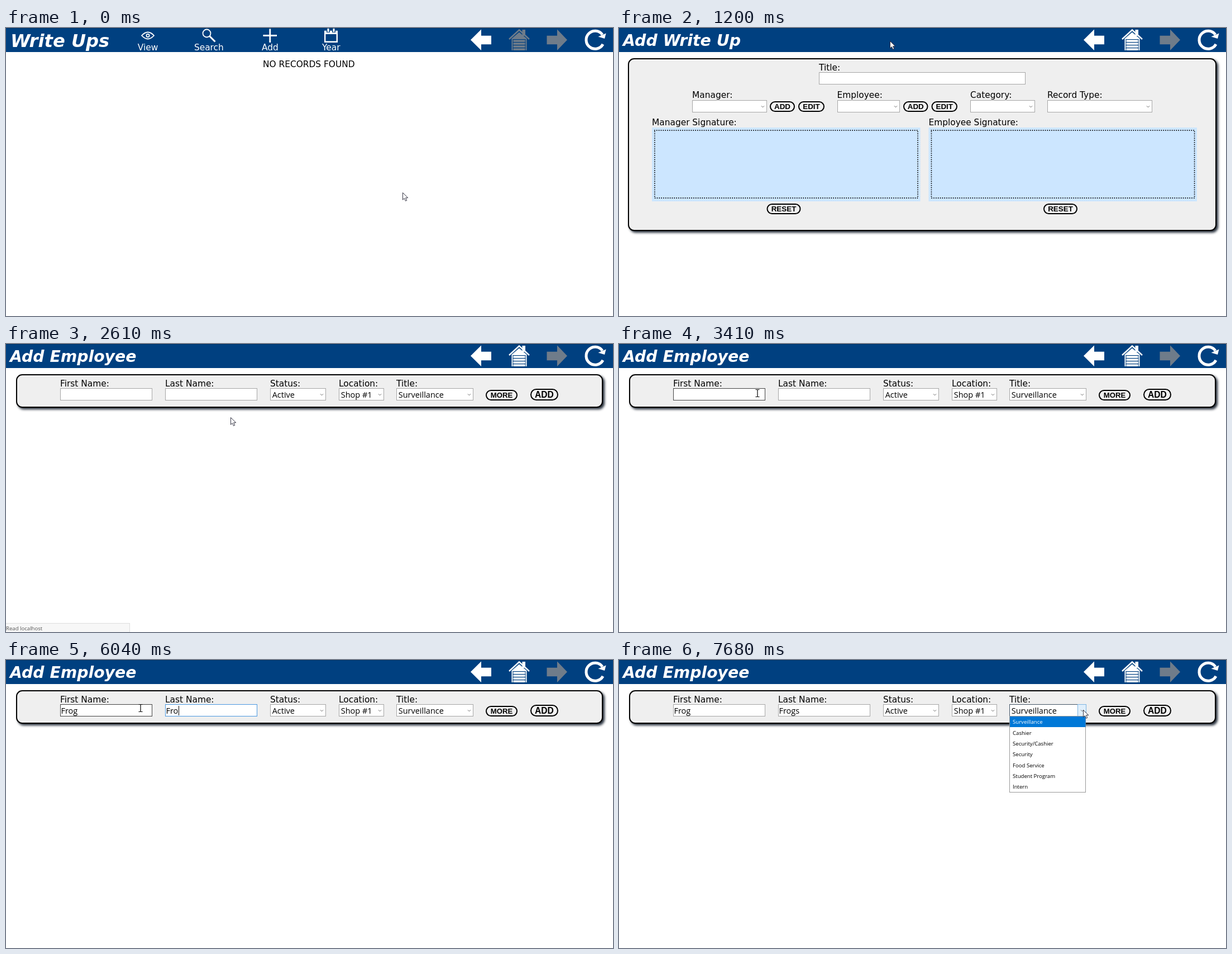
Write an HTML page that moves like this. It is 1087x515 px and loops after 8000 ms.

```html
<!DOCTYPE html>
<html lang="en">
<head>
<meta charset="utf-8">
<title>Write Ups</title>
<style>
  html, body { margin: 0; width: 100%; height: 100%; overflow: hidden; background: #fff; }
  svg { display: block; width: 100%; height: 100%; }
  text { font: 15.4px "DejaVu Sans", sans-serif; white-space: pre; }
  .title { font-weight: bold; font-style: oblique; fill: #fff; }
  .menu { fill: #fff; text-anchor: middle; }
  .value { font: 14.5px "Open Sans", sans-serif; }
  .small { font: 500 9.6px "Open Sans", sans-serif; }
  .button { font: bold 13.4px "Liberation Sans", Arial, sans-serif; text-anchor: middle; }
  .panel { filter: drop-shadow(3px 3px 2px rgba(0, 10, 25, .85)); }
</style>
</head>
<body>
<svg id="stage" viewBox="0 0 1087 515"></svg>
<script>
const LOOP = 8000;
const NAVY = '#004080', GREY = '#6f7c8a', BORDER = '#a6a6a6', HOVER = '#0f52a5';
const FIRST = 'Frog', LAST = 'Frogs';
const stage = document.getElementById('stage');
const pen = document.createElement('canvas').getContext('2d');

const text = (x, y, s, cls = '', extra = '') =>
  `<text x="${x}" y="${y}" class="${cls}" ${extra}>${s}</text>`;
const rect = (x, y, w, h, fill, extra = '') =>
  `<rect x="${x}" y="${y}" width="${w}" height="${h}" fill="${fill}" ${extra}/>`;
const path = (d, fill = 'none', stroke = 'none', width = 1, extra = '') =>
  `<path d="${d}" fill="${fill}" stroke="${stroke}" stroke-width="${width}" ${extra}/>`;

// Boxes are given by their outer left, top, right and bottom edges.
const box = (l, t, r, b, fill, stroke, width = 1, extra = '') =>
  rect(l + width / 2, t + width / 2, r - l - width, b - t - width, fill,
    `stroke="${stroke}" stroke-width="${width}" ${extra}`);

const panel = (l, t, r, b) => box(l, t, r, b, '#efefef', '#000', 2, 'rx="10" class="panel"');
const input = (l, t, r, border = BORDER) => box(l, t, r, t + 22, '#fff', border);
const chevron = (x, y) => path(`M${x - 2.5} ${y - 1.2}l2.5 2.5 2.5-2.5`, 'none', '#666');
const select = (l, t, r, value = '') =>
  input(l, t, r) + chevron(r - 7.5, t + 11.5) + text(l + 3.7, t + 16.5, value, 'value');

function button(l, t, r, label, { color = '#000', height = 19, size = 13.4 } = {}) {
  return box(l, t, r, t + height, '#f2f2f2', color, 2, `rx="${height / 2 - 1}"`) +
    text((l + r) / 2, t + height / 2 + size * .36, label, 'button',
      `fill="${color}" style="font-size:${size}px"`);
}

function field(l, value, border, caret) {
  pen.font = '14.5px "Open Sans", sans-serif';
  const end = Math.round(l + 2 + pen.measureText(value).width);
  return input(l, 79, l + 165, border) + text(l + 1.5, 95.5, value, 'value') +
    (caret ? rect(end, 82, 1, 17, '#000') : '');
}

function house(color) {
  let doors = '';
  for (let y = 20; y < 40; y += 5) doors += rect(907.5, y, 23, 1.2, NAVY);
  return rect(924.5, 3, 5.5, 11, color) +
    path('M901 20L919 3.5 937 20', 'none', color, 2.4) +
    path('M905.5 19L919 7.5 932.5 19V40H905.5z', color) + doors +
    path('M908 20V40M930 20V40', 'none', NAVY, 1);
}

function header(title, size, x, y, homeColor) {
  return rect(0, 0, 1087, 43, NAVY) + rect(0, 0, 1087, 1, '#003366') +
    text(x, y, title, 'title', `style="font-size:${size}px"`) +
    path('M832 21.3L851 2.5V13.7H869V29.3H851V40z', '#fff') + house(homeColor) +
    path('M1005 21.3L987 2.5V13.7H968.5V29.3H987V40z', GREY) +
    path('M1068 12A16 16 0 1 0 1069 29', 'none', '#fff', 5) +
    path('M1060.5 15.5L1074.5 9.5 1072 19z', '#fff');
}

function listPage() {
  const labels = ['View', 'Search', 'Add', 'Year'];
  return header('Write Ups', 32.2, 8, 34, GREY) +
    labels.map((s, i) => text(254 + i * 109.4, 40, s, 'menu')).join('') +
    path('M243 13.5Q254 1.5 265 13.5Q254 25.5 243 13.5z', 'none', '#fff', 1.8) +
    '<circle cx="254" cy="13.5" r="2.6" fill="none" stroke="#fff" stroke-width="1.8"/>' +
    '<circle cx="359.5" cy="9.5" r="7" fill="none" stroke="#fff" stroke-width="1.8"/>' +
    path('M364.5 14.5L374.5 24.5', 'none', '#fff', 3) +
    path('M460.5 13.5H485M472.8 1.5V26', 'none', '#fff', 2.8) +
    path('M571.2 6V24.7H592.8V6z', 'none', '#fff', 2.4) + rect(570, 5, 24, 6, '#fff') +
    path('M577 1V8M587 1V8', 'none', NAVY, 6) + path('M577 1V7M587 1V7', 'none', '#fff', 3) +
    text(460, 69.5, 'NO RECORDS FOUND');
}

function signature(l, label) {
  return text(l, 174, label) + rect(l, 178, 480.5, 132, '#cce6ff') +
    box(l + 4, 182, l + 477, 305, 'none', '#000', 1.9,
      'stroke-dasharray="0 3.85" stroke-linecap="round"') +
    button(l + 205.5, 314, l + 266.5, 'RESET');
}

function writeUpPage({ hover }) {
  return header('Add Write Up', 28.4, 7, 32, '#fff') + panel(16, 54, 1070, 363) +
    text(358, 75.5, 'Title:') + input(358, 79, 728) +
    text(131, 125, 'Manager:') + select(131, 129, 265) +
    button(270, 131, 315, 'ADD') + button(321, 131, 368, 'EDIT') +
    text(390.5, 125, 'Employee:') + select(391, 129, 503) +
    button(509, 131, 553.5, 'ADD', { color: hover ? HOVER : '#000' }) +
    button(559.5, 131, 606, 'EDIT') +
    text(629, 125, 'Category:') + select(629, 129, 745) +
    text(767, 125, 'Record Type:') + select(767, 129, 955) +
    signature(59, 'Manager Signature:') + signature(554.5, 'Employee Signature:');
}

function dropDown() {
  const items = ['Surveillance', 'Cashier', 'Security/Cashier', 'Security',
    'Food Service', 'Student Program', 'Intern'];
  return box(699, 100, 836, 237, '#fff', '#999') + rect(700, 101, 135.5, 19, '#0078d7') +
    items.map((s, i) => text(705, 114.4 + i * 19.33, s, 'small', i ? '' : 'fill="#fff"')).join('');
}

function employeePage({ first = 0, last = 0, focus, caret, over, hover, open }) {
  const border = id => over === id ? '#444' : focus === id ? '#4a98e0' : BORDER;
  return header('Add Employee', 28.3, 7, 32, '#fff') + panel(18, 54, 1069, 114) +
    text(97, 75.5, 'First Name:') +
    field(97, FIRST.slice(0, first), border('first'), caret && focus === 'first') +
    text(285, 75.5, 'Last Name:') +
    field(285, LAST.slice(0, last), border('last'), caret && focus === 'last') +
    text(473, 75.5, 'Status:') + select(473, 79, 573, 'Active') +
    text(596, 75.5, 'Location:') + select(596, 79, 677, 'Shop #1') +
    text(699, 75.5, 'Title:') + select(699, 79, 837, 'Surveillance') +
    (hover ? box(699, 79, 822, 101, 'none', '#456') +
      box(821, 79, 837, 101, '#e0effb', '#7db4e2') + chevron(829.5, 90.5) : '') +
    button(859, 82, 916, 'MORE', { size: 13.2 }) +
    button(939, 80, 989, 'ADD', { height: 21, size: 15.6 }) +
    (open ? dropDown() : '');
}

const statusBar = () => box(-1, 499, 222, 516, '#f7f7f7', '#dedede') +
  text(0, 512, 'Read localhost', 'small', 'fill="#555"');

const cursors = {
  arrow: path('M.5 .5V13.2L3.4 10.5 5.5 15.3 7.7 14.3 5.7 9.7H9.8z', '#fff', '#223', .9),
  hand: path('M-1 1.2Q.5-.6 2 1.2V6L7 7Q8.6 7.4 8.4 9L7.4 13V16H0V13.5L-4 8.8Q-3.8 7-1 9z',
    '#fff', '#223', .9),
  beam: path('M-3.5-6.5H-1L0-5.8 1-6.5H3.5M0-6V6M-3.5 6.5H-1L0 5.8 1 6.5H3.5', 'none', '#000', 1.2)
};

// Each step: start time, page, cursor kind, cursor x and y, page state.
const inFirst = { over: 'first' };
const typeFirst = (first, caret = true) => ({ first, caret, focus: 'first', over: 'first' });
const typeLast = (last, caret = true) => ({ first: 4, last, caret, focus: 'last', over: 'first' });
const leaving = { first: 4, last: 5, focus: 'last' };
const steps = [
  [0, listPage, 'arrow', 710, 294],
  [200, listPage, 'arrow', 655, 225],
  [400, listPage, 'arrow', 550, 105],
  [600, listPage, 'hand', 492, 34],
  [800, listPage, 'hand', 485, 23],
  [1000, writeUpPage, 'arrow', 485, 23, { status: true }],
  [1200, writeUpPage, 'arrow', 485, 23],
  [1590, writeUpPage, 'arrow', 489, 45],
  [1800, writeUpPage, 'arrow', 500, 87],
  [2000, writeUpPage, 'arrow', 514, 122],
  [2200, writeUpPage, 'hand', 523, 136, { hover: true }],
  [2400, writeUpPage, 'hand', 521, 139.5, { hover: true }],
  [2610, employeePage, 'arrow', 402, 131, { status: true }],
  [2830, employeePage, 'arrow', 345, 119],
  [3030, employeePage, 'arrow', 280, 103],
  [3230, employeePage, 'beam', 248, 88, inFirst],
  [3430, employeePage, 'beam', 241, 80, inFirst],
  [3620, employeePage, 'beam', 241, 84, inFirst],
  [3810, employeePage, 'beam', 241, 86, inFirst],
  [4010, employeePage, 'beam', 241, 86, typeFirst(0)],
  [4210, employeePage, 'beam', 241, 86, typeFirst(0, false)],
  [4420, employeePage, 'beam', 241, 86, typeFirst(1)],
  [4620, employeePage, 'beam', 241, 86, typeFirst(2)],
  [4820, employeePage, 'beam', 241, 86, typeFirst(4)],
  [5240, employeePage, 'beam', 241, 86, typeLast(0)],
  [5640, employeePage, 'beam', 241, 86, typeLast(1)],
  [5840, employeePage, 'beam', 241, 86, typeLast(2)],
  [6040, employeePage, 'beam', 241, 86, typeLast(3)],
  [6250, employeePage, 'beam', 241, 86, typeLast(4)],
  [6450, employeePage, 'beam', 241, 86, typeLast(5)],
  [6650, employeePage, 'beam', 241, 86, typeLast(5, false)],
  [6870, employeePage, 'beam', 320, 88, { ...leaving, over: 'last', caret: true }],
  [7080, employeePage, 'arrow', 560, 90, leaving],
  [7280, employeePage, 'arrow', 780, 91, { ...leaving, hover: true }],
  [7480, employeePage, 'arrow', 831, 89, { ...leaving, hover: true }],
  [7680, employeePage, 'arrow', 831, 89, { first: 4, last: 5, hover: true, open: true }]
];

let shown;
function draw(now) {
  const t = now % LOOP;
  const step = steps.findLast(s => s[0] <= t);
  if (step !== shown) {
    const [, page, cursor, x, y, state = {}] = shown = step;
    stage.innerHTML = page(state) + (state.status ? statusBar() : '') +
      `<g transform="translate(${x} ${y})">${cursors[cursor]}</g>`;
  }
}

const start = performance.now();
function tick() {
  draw(performance.now() - start);
  requestAnimationFrame(tick);
}
tick();
</script>
</body>
</html>
```
